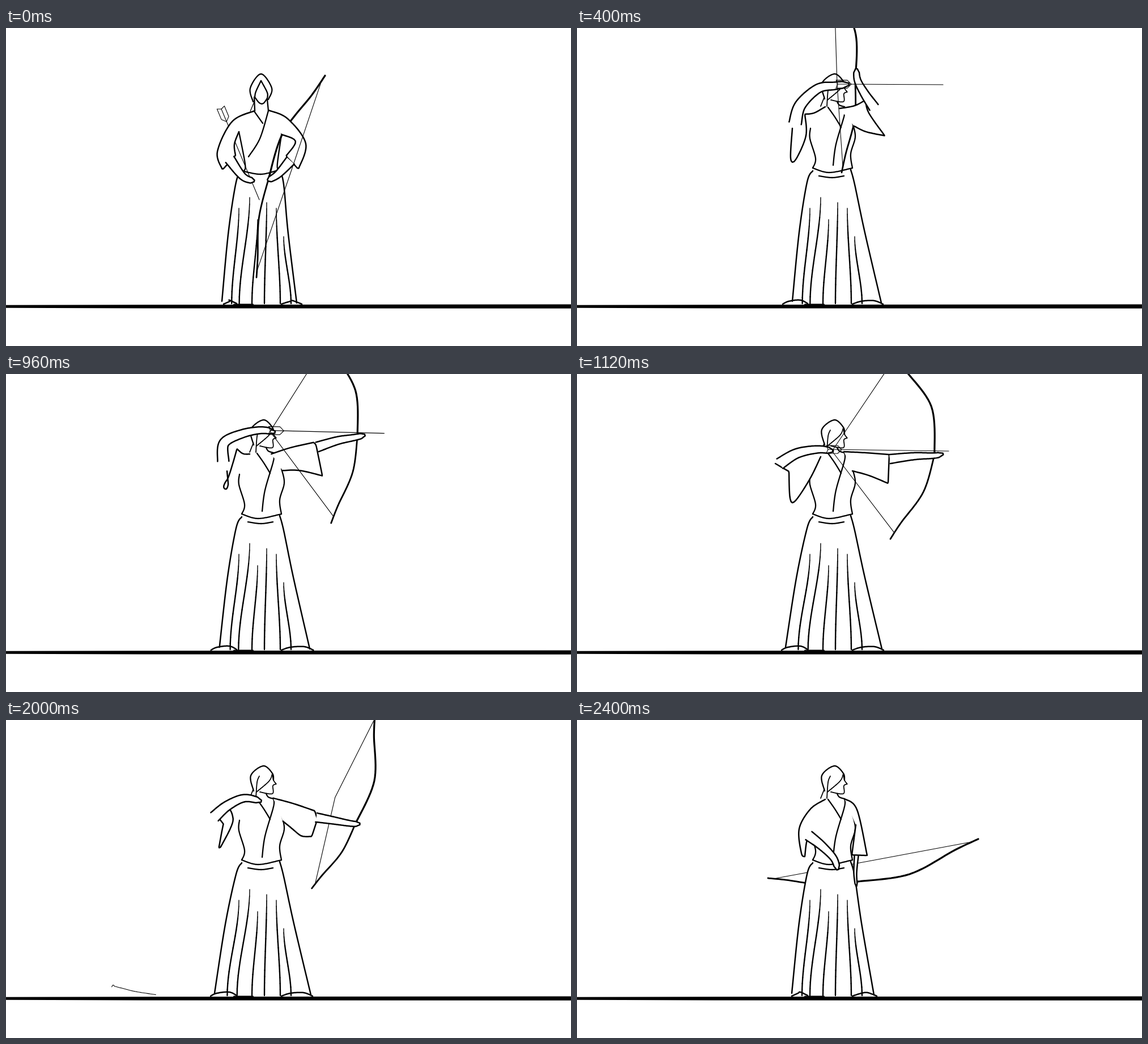
These frames come from a looping animation (997 px wide and 561 px high, 2720 ms). An HTML page with a canvas:

```html
<!DOCTYPE html>
<html lang="en">
<head>
<meta charset="utf-8">
<title>Archer</title>
<style>
html, body { margin: 0; width: 100%; height: 100%; overflow: hidden; background: #fff; }
canvas { display: block; }
</style>
</head>
<body>
<canvas id="stage" width="997" height="561"></canvas>
<script>
const ctx = document.getElementById('stage').getContext('2d');
const LOOP = 2720, STEP = 80, SAMPLES = 60;
const RELEASE = 1840, BODY = 2.5, HAIRLINE = 1.1;

const mix = (a, b, k) => a + (b - a) * k;
const blend = (a, b, k) => Array.isArray(a) ? a.map((v, i) => blend(v, b[i], k)) : mix(a, b, k);
const points = text => text.trim().split(' ').map(p => p.split(',').map(Number));

function spline(pts) {
  const at = i => pts[Math.max(0, Math.min(pts.length - 1, i))];
  const out = [pts[0]];
  for (let i = 0; i < pts.length - 1; i++) {
    const [a, b, c, d] = [at(i - 1), at(i), at(i + 1), at(i + 2)];
    for (let s = 1; s <= 12; s++) {
      const u = s / 12;
      out.push(b.map((_, n) => b[n] + .5 * u * (c[n] - a[n] +
        u * (2 * a[n] - 5 * b[n] + 4 * c[n] - d[n] + u * (3 * (b[n] - c[n]) + d[n] - a[n])))));
    }
  }
  return out;
}

// Even samples along a smooth curve, so that any two curves can be blended.
function resample(curve) {
  const dist = [0];
  for (let i = 1; i < curve.length; i++)
    dist.push(dist[i - 1] + Math.hypot(curve[i][0] - curve[i - 1][0], curve[i][1] - curve[i - 1][1]));
  let j = 0;
  return Array.from({ length: SAMPLES + 1 }, (_, i) => {
    const at = dist[dist.length - 1] * i / SAMPLES;
    while (j < curve.length - 2 && dist[j + 1] < at) j++;
    return blend(curve[j], curve[j + 1], (at - dist[j]) / (dist[j + 1] - dist[j] || 1));
  });
}

// "/" ends a smooth run in a sharp corner.
function trace(text) {
  let curve = [];
  for (const part of text.split('/'))
    curve = curve.concat(spline([...curve.slice(-1), ...points(part)]));
  return resample(curve);
}

function path(pts, width, { fill, dash = [] } = {}) {
  ctx.beginPath();
  pts.forEach(p => ctx.lineTo(...p));
  if (fill) { ctx.fillStyle = fill; ctx.fill(); }
  if (!width) return;
  ctx.lineWidth = width;
  ctx.setLineDash(dash);
  ctx.stroke();
}

function figure(parts) {
  const lines = Object.entries(parts).map(([width, texts]) => [+width, texts.map(trace)]);
  return () => lines.forEach(([width, curves]) => curves.forEach(c => path(c, width)));
}

const frontView = figure({
  2.3: ['436,130 431,106 450,81 469,106 463,126', '450,93 441,112 439,122',
    '450,93 461,114 461,124 / 454,133 447,132 439,122',
    '438,122 439,146', '461,126 463,146',
    '438,147 453,168', '463,146 448,195 428,227', '420,253 450,258 480,251',
    '411,183 422,240 420,252', '487,182 479,238 480,250'],
  1.3: ['439,128 431,147']
});
const sideView = figure({
  2.3: ['437,125 432,98 454,81 470,94 472,106', '459,130 463,136 472,139',
    '416,247 445,255 486,247', '427,261 450,264 471,261',
    '412,177 411,195 421,230 416,247', '486,167 491,192 483,222 486,247',
    '443,140 455,157 466,175', '472,139 472,153 457,205 452,242'],
  1.8: ['470,95 472,106 477,113 / 471,116 470,130 448,127', '470,95 464,108 442,127',
    '447,99 443,110 441,138', '436,123 430,138']
});

// Arms are centre lines; the bow is top, grip, bottom and string hold; the arrow is tail and tip;
// the hem is left and right edge, then the two toes.
const ready = {
  hem: [381, 513, 384, 522], girth: [9, 9], bend: -.08,
  sleeveL: '439,146 399,165 373,218 382,250 / 405,225 / 403,205 411,183',
  armL: '395,232 418,262 438,270',
  sleeveR: '463,145 497,160 529,204 516,249 / 494,226 / 511,200 487,188',
  armR: '502,234 480,258 462,269',
  bow: '563,84 463,267 442,440 504,250', arrow: '380,143 447,303'
};
const raise = {
  hem: [380, 537, 363, 540], girth: [11, 9], bend: .09,
  sleeveL: '438,139 418,150 402,152 / 404,190 386,232 377,230 380,177',
  armL: '385,168 394,136 425,107 455,102 480,99',
  sleeveR: '463,142 490,137 509,127 / 515,150 543,190 / 510,183 489,173',
  armR: '524,140 507,115 495,92 493,72',
  bow: '450,-100 491,92 467,255 459,99', arrow: '460,99 646,100'
};
const aim = {
  hem: [381, 535, 362, 543], girth: [10, 9], bend: .1,
  sleeveL: '430,139 415,130 405,107 / 397,157 389,200 398,213 410,178',
  armL: '396,152 386,112 420,91 460,82 486,86',
  sleeveR: '467,143 500,126 543,110 / 563,173 / 520,166 489,170',
  armR: '548,118 580,104 605,97 627,91',
  bow: '565,-85 615,90 584,249 474,84', arrow: '478,83 673,89'
};
const draw = {
  hem: [368, 538, 361, 541], girth: [10, 8], bend: .13,
  sleeveL: '430,146 411,185 385,224 376,219 374,172 / 350,158',
  armL: '358,158 388,140 425,133 452,136',
  sleeveR: '471,137 510,139 551,142 / 549,193 / 515,179 486,171',
  armR: '552,150 595,145 630,144 646,141',
  bow: '556,-45 631,142 553,291 450,136', arrow: '443,133 656,136'
};
const release = {
  ...draw, girth: [11, 8], bend: .11,
  sleeveL: '440,138 400,149 385,151 / 418,180 391,227 381,228 377,178 / 350,166',
  armL: '362,171 380,143 406,119 436,118',
  bow: '605,-60 632,143 586,287 569,100',
  swirl: '311,468 297,464 283,467 305,477 337,483'
};
const lower = {
  ...draw, girth: [8, 8], bend: .08,
  sleeveL: '441,140 405,150 376,163 / 367,210 371,216 392,193 410,178',
  armL: '377,170 405,162 440,164 472,181',
  sleeveR: '472,139 505,161 548,199 / 525,224 505,232 493,190',
  armR: '541,205 565,230 592,247',
  bow: '721,55 594,242 470,312 598,192',
  swirl: '0,475 30,473 70,474 105,480 155,487'
};
const rest = {
  ...draw, hem: [379, 524, 379, 529], girth: [9, 3.5], bend: .08,
  sleeveL: '438,140 412,157 392,192 396,235 402,241 / 406,212 416,200',
  armL: '409,204 432,222 453,244 460,264',
  sleeveR: '472,139 494,158 512,239 / 485,238 / 492,185',
  armR: '493,240 491,270 493,293',
  bow: '708,210 496,285 337,279 520,248',
  swirl: '-160,478 -100,476 -60,480 -20,486'
};

// Each pose is reached at `to`, moving on from the one before after `from`.
const keys = [[ready, 0, 0], [raise, 80, 400], [aim, 400, 640], [draw, 880, 1120],
  [release, 1760, 1840], [lower, 1840, 2240], [rest, 2240, 2400]]
  .map(([pose, from, to]) => ({ from, to, pose: Object.fromEntries(Object.entries(pose)
    .map(([name, v]) => [name, typeof v !== 'string' ? v
      : /bow|arrow/.test(name) ? points(v) : trace(v)])) }));

function poseAt(time) {
  const i = keys.filter(k => k.to <= time).length - 1;
  const now = keys[i].pose, next = keys[i + 1];
  if (!next || time <= next.from) return now;
  const k = (time - next.from) / (next.to - next.from);
  return Object.fromEntries(Object.keys(now).map(name => [name, blend(now[name], next.pose[name], k)]));
}

function skirt([left, right, toeL, toeR]) {
  const sideL = spline([[416, 252], [406, 272], [mix(406, left, .42) - 3, 360], [left, 482]]);
  const sideR = spline([[483, 250], [490, 276], [mix(490, right, .42) - 2, 360], [right, 485]]);
  path([...sideL, ...sideR.slice().reverse()], 0, { fill: '#fff' });
  path(sideL, BODY);
  path(sideR, BODY);
  path(spline([[toeL, 487], [toeL + 11, 482], [394, 480], [407, 486]]), BODY);
  path(spline([[486, 487], [502, 482], [toeR - 16, 481], [toeR, 487]]), BODY);
  points('411,397 430,411 444,434 460,456 477,484 490,503').forEach(([top, foot], i) => {
    const y = [318, 299, 338, 308, 318, 368][i];
    pleat(top, y, foot + (left - 379) * Math.max(0, .6 - .3 * i));
  });
}

function pleat(x, y, foot) {
  const n = 16, curve = [];
  for (let i = 0; i <= n; i++) {
    const u = i / n;
    curve.push([mix(x, foot, u * u * (3 - 2 * u)), mix(y, 486, u)]);
  }
  for (let i = 0; i < n; i++) path(curve.slice(i, i + 2), Math.min(2.4, 1.4 + i * .25));
}

function limb(tip, grip, bend) {
  const [dx, dy] = [grip[0] - tip[0], grip[1] - tip[1]];
  const at = (k, off) => [tip[0] + dx * k + dy * off, tip[1] + dy * k - dx * off];
  return spline([tip, at(.2, bend * .25), at(.6, bend), grip]);
}

function bow([top, grip, bottom], bend) {
  path(limb(top, grip, bend), 3.2);
  path(limb(bottom, grip, -bend * .6), 2.8);
}

function string([top, grip, bottom, hold], loose) {
  path([blend(top, grip, .08), hold, blend(bottom, grip, .08)], HAIRLINE, { dash: loose ? [9, 3, 3, 3] : [] });
}

function arrow([tail, tip]) {
  const angle = Math.atan2(tip[1] - tail[1], tip[0] - tail[0]);
  path([tail, tip], HAIRLINE);
  ctx.save();
  ctx.translate(...tail);
  ctx.rotate(angle);
  feather(HAIRLINE);
  ctx.restore();
}

function feather(width, dash) {
  path(points('0,0 -3,-7 17,-7 24,0 17,7 -3,7 0,0'), width, { dash });
}

function arm(sleeve, centre, girth) {
  path(sleeve, BODY, { fill: '#fff' });
  const last = centre.length - 1;
  const side = sign => centre.map((p, i) => {
    const a = centre[Math.max(0, i - 1)], b = centre[Math.min(last, i + 1)];
    const len = Math.hypot(b[0] - a[0], b[1] - a[1]) || 1;
    const half = sign * mix(girth, girth * .5, i / last) * Math.min(1, .35 + (last - i) / 8);
    return [p[0] - (b[1] - a[1]) / len * half, p[1] + (b[0] - a[0]) / len * half];
  });
  path([...side(1), ...side(-1).reverse()], BODY, { fill: '#fff' });
}

function flight(shift) {
  let seed = 7;
  const random = () => (seed = seed * 16807 % 2147483647) / 2147483647;
  ctx.save();
  ctx.translate(shift, 0);
  for (let i = 0; i < 10; i++) {
    const y = i < 2 ? 106 + i * 12 : 120 + i * 4;
    const x = 620 + random() * 170;
    path([[x, y], [x + 120 + random() * 170, y + random() * 4]], HAIRLINE, { dash: [26, 4, 12, 3] });
  }
  for (let i = 0; i < 2; i++) {
    ctx.translate(i ? 84 : 698, i ? 0 : 133);
    feather(HAIRLINE, [7, 3]);
  }
  ctx.restore();
}

function ground() {
  path(points('0,488.7 240,488.3 997,487.4 997,494.8 240,494.4 0,493.8'), 0, { fill: '#000' });
  path([[402, 487.5], [436, 487.5]], 2);
}

function render(time) {
  const pose = poseAt(time);
  const turned = time >= 240, shot = time >= RELEASE;
  const loose = shot && time < RELEASE + 2 * STEP;
  ctx.clearRect(0, 0, 997, 561);
  ctx.strokeStyle = '#000';
  ctx.lineCap = ctx.lineJoin = 'round';
  const gear = () => { bow(pose.bow, pose.bend); if (shot) string(pose.bow, loose); };
  if (shot) gear();
  skirt(pose.hem);
  (turned ? sideView : frontView)();
  if (!shot) gear();
  if (!turned) arrow(pose.arrow);
  arm(pose.sleeveL, pose.armL, pose.girth[0]);
  arm(pose.sleeveR, pose.armR, pose.girth[1]);
  if (!shot) string(pose.bow);
  if (turned && !shot) arrow(pose.arrow);
  if (loose) flight((time - RELEASE) * 2.2);
  if (pose.swirl) path(pose.swirl, HAIRLINE);
  ground();
}

function tick() {
  render(Math.floor(performance.now() % LOOP / STEP) * STEP);
  requestAnimationFrame(tick);
}
tick();
</script>
</body>
</html>
```
